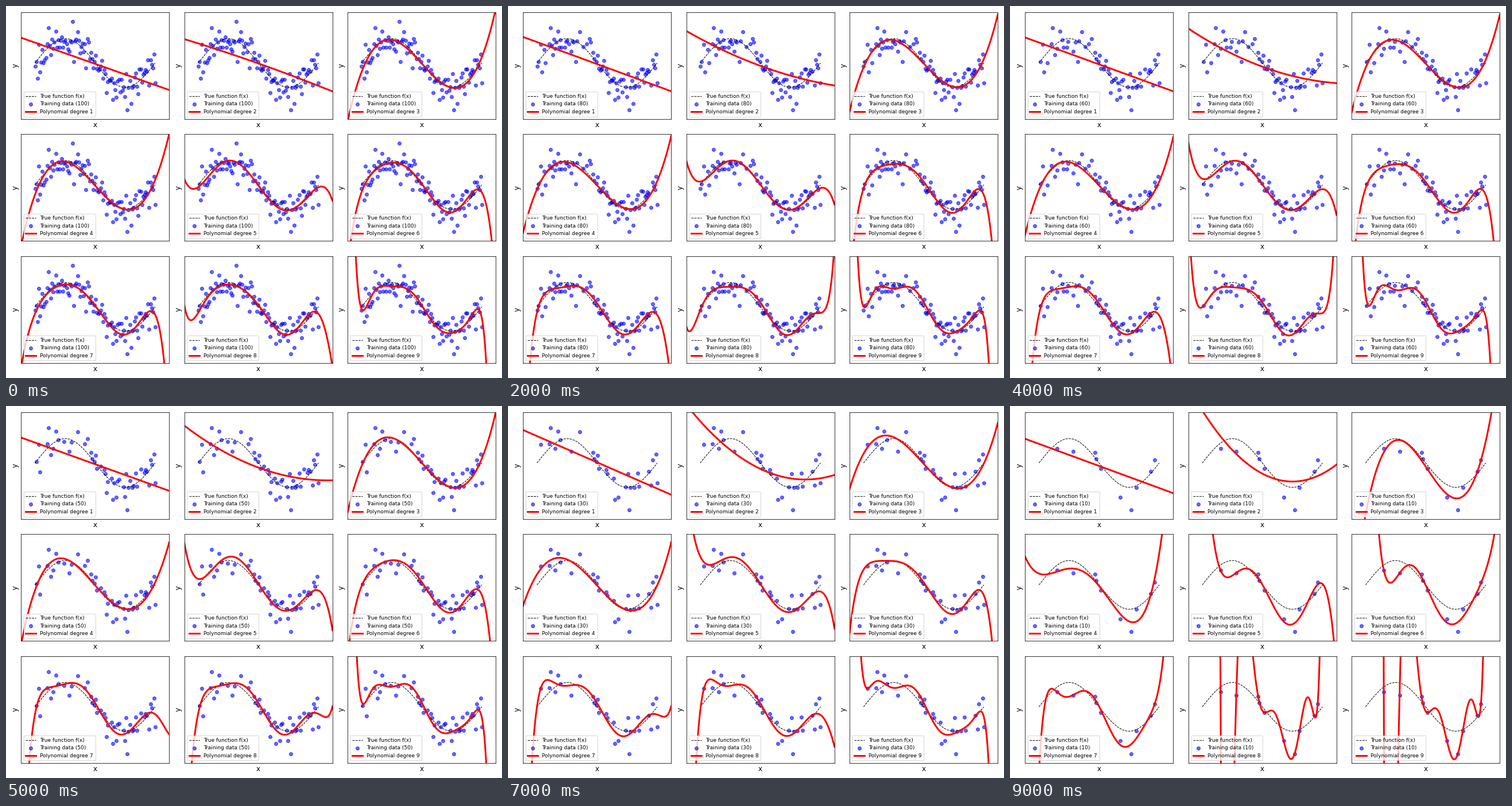
Animation of 864x648 px, one loop 10000 ms. Source, as a matplotlib script:

```python
import numpy as np
import matplotlib.pyplot as plt
from matplotlib.animation import FuncAnimation

WIDTH, HEIGHT, DPI = 864, 648, 72
EDGE, LABEL_EDGE = 10.8, 26.15   # outer margins in pixels
SPAN = 3.0
PAD = 0.2
STEP = 10

rng = np.random.RandomState(2)
x = np.linspace(0, SPAN, 100)


def true_f(t):
    return np.sin(2 * np.pi * t / SPAN)


y = true_f(x) + rng.normal(0, 0.35, x.size)

# Samples that stay longest; the others leave in random order
anchors = [15, 28, 46, 47, 51, 67, 76, 80, 92, 95,
           17, 19, 35, 49, 64, 73, 77, 83, 84, 94]
others = [i for i in rng.permutation(x.size) if i not in anchors]
order = np.array(anchors + others)


def limits(v):
    margin = 0.05 * np.ptp(v) + PAD
    return v.min() - margin, v.max() + margin


def gap(total):
    """Space between panels as a share of the panel size."""
    panel = (total - EDGE - 3 * LABEL_EDGE) / 3
    return LABEL_EDGE / panel


xlim, ylim = limits(x), limits(y)
grid = np.linspace(*xlim, 400)

fig, axes = plt.subplots(3, 3, figsize=(WIDTH / DPI, HEIGHT / DPI), dpi=DPI)
fig.subplots_adjust(left=LABEL_EDGE / WIDTH, right=1 - EDGE / WIDTH,
                    bottom=LABEL_EDGE / HEIGHT, top=1 - EDGE / HEIGHT,
                    wspace=gap(WIDTH), hspace=gap(HEIGHT))
panels = []
for degree, ax in enumerate(axes.flat, 1):
    ax.plot(x, true_f(x), "k--", lw=1, label="True function f(x)")
    dots = ax.scatter(x, y, s=36, color="blue", alpha=0.6,
                      label="Training data (100)")
    curve, = ax.plot(grid, 0 * grid, "r", lw=3,
                     label=f"Polynomial degree {degree}")
    ax.set(xlim=xlim, ylim=ylim, xticks=[], yticks=[])
    ax.set_xlabel("x", fontsize=12)
    ax.set_ylabel("y", fontsize=12)
    legend = ax.legend(loc="lower left", fontsize=9)
    panels.append((degree, dots, curve, legend.get_texts()[1]))


def update(frame):
    keep = np.sort(order[:x.size - frame * STEP])
    px, py = x[keep], y[keep]
    artists = []
    for degree, dots, curve, count in panels:
        fit = np.polynomial.Polynomial.fit(px, py, degree)
        dots.set_offsets(np.column_stack([px, py]))
        curve.set_ydata(fit(grid))
        count.set_text(f"Training data ({px.size})")
        artists += [dots, curve, count]
    return artists


anim = FuncAnimation(fig, update, frames=10, interval=1000, repeat=True,
                     repeat_delay=0, init_func=lambda: update(0))
plt.show()
```
